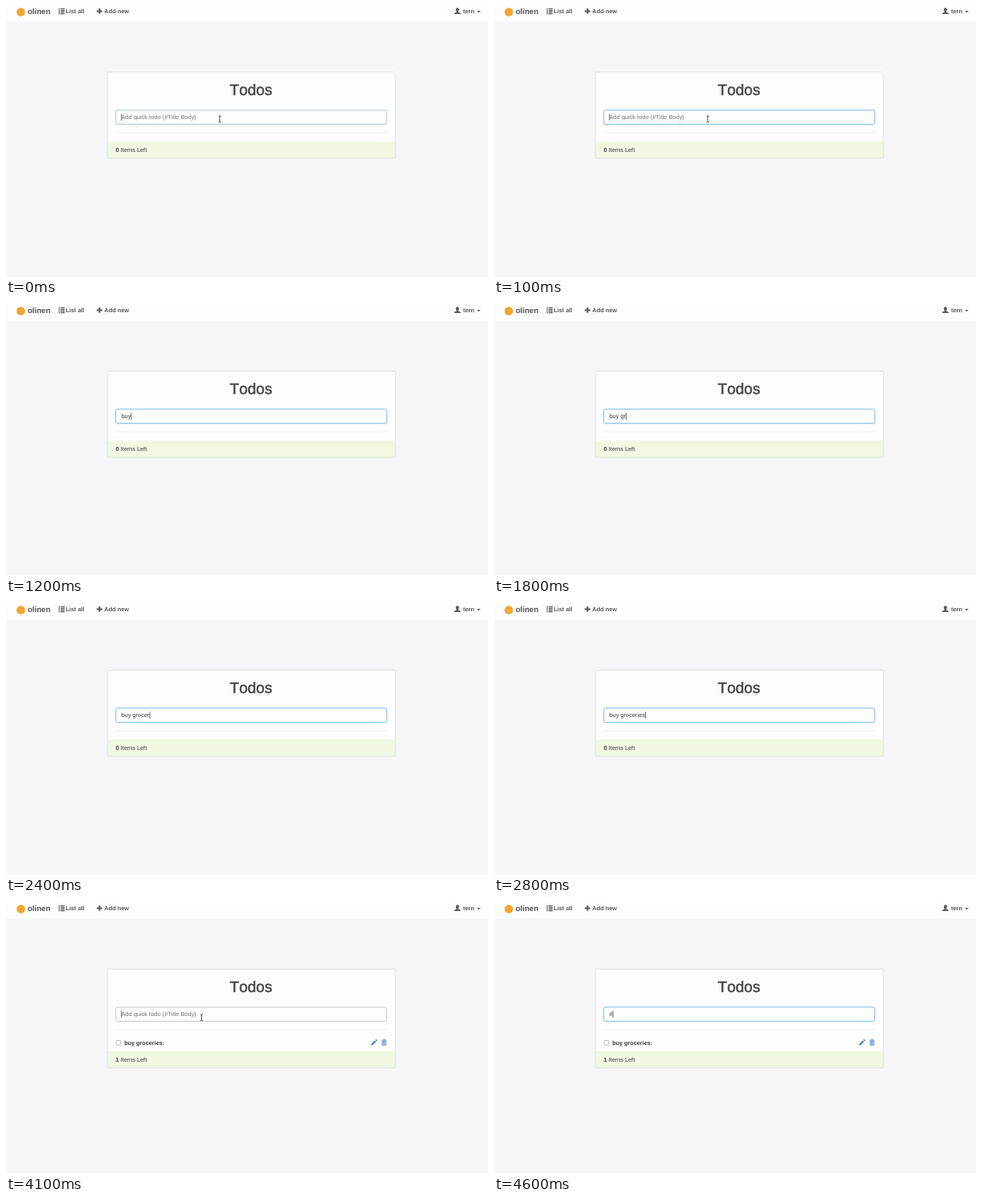
An HTML page that plays this animation: 600 by 338 pixels, repeating every 5100 ms.

```html
<!DOCTYPE html>
<html lang="en">
<head>
<meta charset="utf-8">
<title>Todos</title>
<style>
  html, body { margin: 0; height: 100%; overflow: hidden; background: #f6f5f8; }
  svg { display: block; width: 100vw; height: 100vh; }
  text {
    font: 7.45px "Liberation Sans", Arial, sans-serif; font-kerning: none;
    fill: #3a3a3c; white-space: pre; text-rendering: geometricPrecision;
  }
  .bold { font-weight: bold; }
  .nav text { font-size: 7.4px; font-weight: bold; fill: #58585a; }
  .nav .brand { font-size: 9.6px; fill: #505052; }
  .nav .icon { fill: #58585a; }
  .title { font-size: 19px; text-anchor: middle; stroke: #444446; stroke-width: .5px; fill: #444446; }
  .line { fill: none; stroke-width: 1px; }
  .blue { fill: #3f7fbd; }
  #hint { fill: #717174; }
  #caret { stroke: #444; stroke-width: .8px; }
  #beam { fill: none; stroke: #444; stroke-width: .9px; }
</style>
</head>
<body>
<svg viewBox="0 0 600 338">
  <defs>
    <filter id="soft" x="-5%" y="-50%" width="110%" height="200%">
      <feGaussianBlur stdDeviation=".9"/>
    </filter>
  </defs>
  <rect width="600" height="338" fill="#f6f5f8"/>
  <rect y="337" width="600" height="1" fill="#fdfdfd"/>

  <g class="nav">
    <rect width="600" height="19.3" fill="#fefdfe"/>
    <circle cx="18.5" cy="7.5" r="5.3" fill="#f2a533"/>
    <text class="brand" x="27" y="10">olinen</text>
    <path class="icon" d="M65.5 3h1.5v1.2h-1.5zm2.3 0h5.2v1.2h-5.2zM65.5 5h1.5v1.2h-1.5zm2.3 0h5.2v1.2h-5.2zM65.5 7h1.5v1.2h-1.5zm2.3 0h5.2v1.2h-5.2zM65.5 9h1.5v1.2h-1.5zm2.3 0h5.2v1.2h-5.2z"/>
    <text x="74.2" y="9.2">List all</text>
    <path class="icon" d="M115.4 3h2v2.4h2.5v2h-2.5v2.4h-2v-2.4h-2.5v-2h2.5z"/>
    <text x="122.3" y="9.2">Add new</text>
    <path class="icon" d="M561.9 2.2c1.3 0 2 1 2 2.3 0 1.2-.5 1.9-1 2.4v.6l2.3 1c.5.2.6.7.6 1.5h-7.8c0-.8.1-1.3.6-1.5l2.3-1v-.6c-.5-.5-1-1.2-1-2.4 0-1.3.7-2.3 2-2.3z"/>
    <text x="569" y="9.2">tern</text>
    <path class="icon" d="M586.2 6h4.4l-2.2 2.3z"/>
  </g>

  <rect id="panel" x="126" y="82.5" width="359" rx="2" fill="#fefdfe"/>
  <text class="title" x="305" y="110.8">Todos</text>
  <path class="line" d="M136.5 158H474" stroke="#f2f1f3"/>

  <g id="item">
    <rect x="137.1" y="171.4" width="5.6" height="5.6" rx="1.3" fill="#fff" stroke="#a4a4a6" stroke-width=".8"/>
    <text class="bold" style="font-size:7.25px" x="147.2" y="176.7">buy groceries:</text>
    <path class="blue" d="M454.4 177.7l.6-2.1 4.2-4.2 1.5 1.5-4.2 4.2zM459.8 170.8l.6-.6q.4-.3.8 0l.8.8q.3.4 0 .8l-.6.6z"/>
    <path class="line" d="M468.1 172.5h5v4.9h-5zM469.4 172.800v4.400M470.600 172.800v4.400M471.800 172.800v4.400M467.200 171.300h6.800M469.300 170.900v-.8h2.600v.8" stroke="#4a86c0" style="stroke-width:.7px"/>
  </g>

  <g id="foot">
    <rect x="126.5" y="169" width="358" height="21" fill="#f1f8e2"/>
    <text class="bold" style="font-size:7.4px" x="136.6" y="182.2"><tspan id="count">0</tspan><tspan font-weight="normal"> Items Left</tspan></text>
  </g>
  <rect id="edge" class="line" x="126.2" y="82.5" width="358.6" rx="2" stroke="#dfe4de"/>

  <rect id="glow" class="line" x="136.8" y="130" width="337" height="17.5" rx="2.2" stroke="#7dbdec" style="stroke-width:2px" filter="url(#soft)"/>
  <rect id="field" class="line" x="136.8" y="130" width="337" height="17.5" rx="2" style="fill:#fefdfe"/>
  <text id="hint" x="143.4" y="141.2">Add quick todo (#Title Body)</text>
  <text id="typed" x="143.4" y="141.2"></text>
  <path id="caret" d="M0 134.4V142.9"/>
  <path id="beam" d="M-1.7 -4Q0 -4 0 -2.8Q0 -4 1.7 -4M0 -3V3M-1.7 4Q0 4 0 2.8Q0 4 1.7 4"/>
</svg>
<script>
  const LOOP = 5100;
  const el = id => document.getElementById(id);
  const [panel, edge, item, foot, count, glow, field, hint, typed, caret, beam] =
    ["panel", "edge", "item", "foot", "count", "glow", "field", "hint", "typed", "caret", "beam"].map(el);

  const phrase = "buy groceries";
  const keyTimes = [1000, 1100, 1200, 1300, 1600, 1800, 1900, 2000, 2100, 2400, 2500, 2600, 2800];
  const during = (t, from, to) => t >= from && t < to;
  const show = (node, on) => node.setAttribute("visibility", on ? "visible" : "hidden");

  function textAt(t) {
    if (t >= 4600) return "#";
    return t < 3000 ? phrase.slice(0, keyTimes.filter(k => k <= t).length) : "";
  }

  // Border style of the input: [stroke, glow opacity]
  function focusAt(t) {
    if (t < 100) return ["#a9cdd6", .1];
    if (during(t, 3000, 4200)) return ["#c8c8ca", 0];
    if (during(t, 4200, 4300)) return ["#a9c9de", .15];
    return ["#8ac2e6", .35];
  }

  function draw(t) {
    const added = t >= 3000;
    const grow = added ? 15.7 : 0;
    for (const box of [panel, edge]) box.setAttribute("height", 107.5 + grow);
    foot.setAttribute("transform", `translate(0 ${grow})`);
    count.textContent = added ? "1" : "0";
    show(item, added);

    const [stroke, shine] = focusAt(t);
    field.setAttribute("stroke", stroke);
    glow.setAttribute("opacity", shine);

    const text = textAt(t);
    typed.textContent = text;
    show(hint, !text);
    const end = text ? typed.getComputedTextLength() : 0;
    caret.setAttribute("transform", `translate(${143.9 + end} 0)`);
    show(caret, text || t < 400 || during(t, 4100, 4500));

    show(beam, t < 900 || during(t, 4000, 4500));
    beam.setAttribute("transform", added ? "translate(243.5 142.8)" : "translate(266 141)");
  }

  const start = performance.now();
  function tick(now) {
    draw(Math.max(0, now - start) % LOOP);
    requestAnimationFrame(tick);
  }
  draw(0);
  requestAnimationFrame(tick);
</script>
</body>
</html>
```
